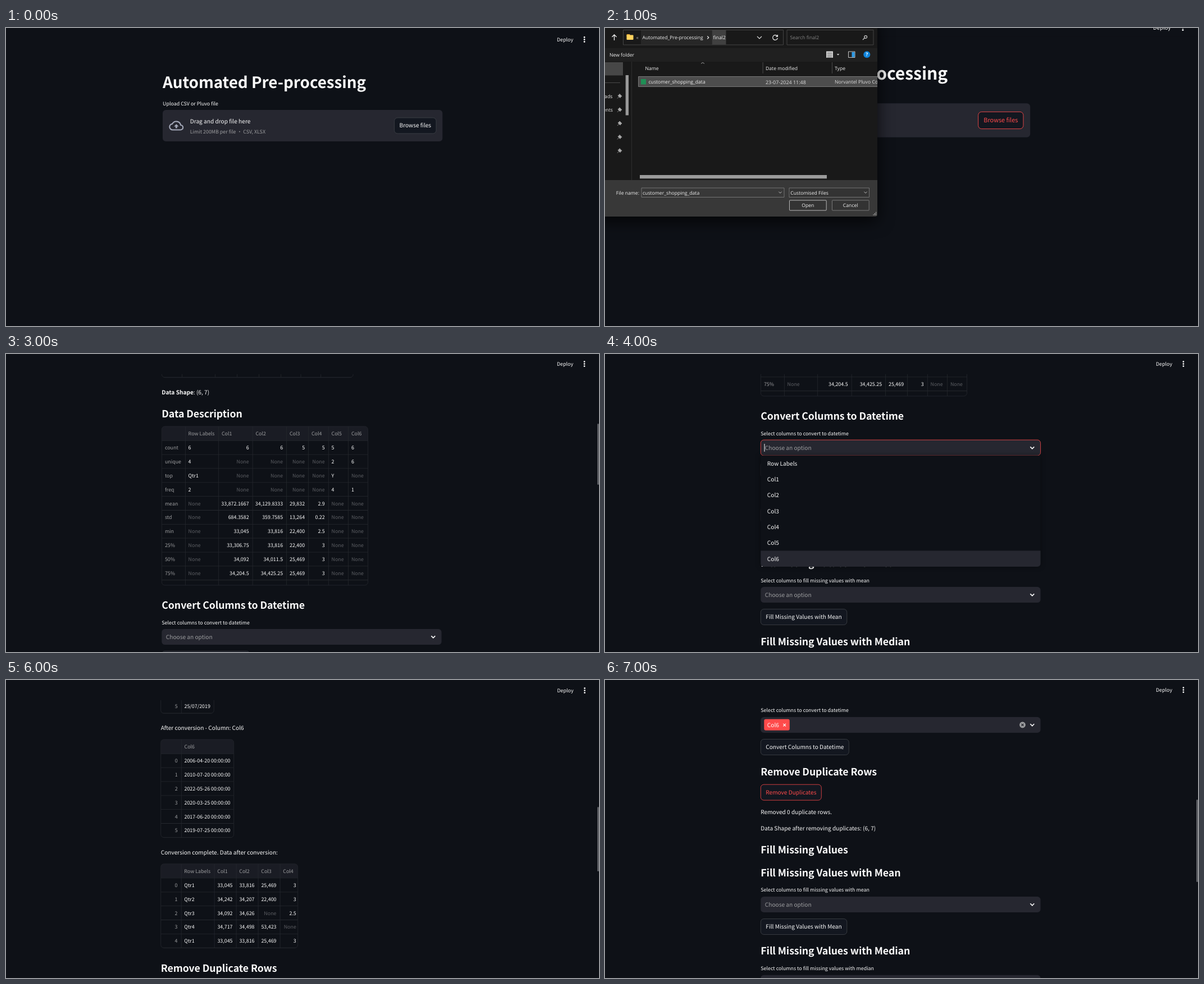
Animation of 1056x531 px, one loop 8 s. Source, as an HTML page with a canvas:

```html
<!DOCTYPE html>
<html lang="en">
<head>
<meta charset="utf-8">
<title>Automated Pre-processing</title>
<style>
html, body { margin: 0; height: 100%; overflow: hidden; background: #0e1117; }
canvas { display: block; }
</style>
</head>
<body>
<canvas id="stage" width="1056" height="531"></canvas>
<script>
const ctx = document.getElementById('stage').getContext('2d');
const SANS = '"Noto Sans CJK SC", "Noto Sans CJK JP", sans-serif';
const DIALOG_FONT = '"Open Sans", "Noto Sans", sans-serif';
const BG = '#0e1117', PANEL = '#262730', WHITE = '#fafafa', RED = '#ff4b4b';
const GREY = '#9c9d9f', DIM = '#5b5d62', LINE = '#25282e', EDGE = '#41444a';
const BODY = 10.15, SMALL = 8.88, H3 = 17.75, H1 = 27.9;
const WIDTH = 498.3, ROW = 24.85;

// y is the middle of the capital letters
function text(str, x, y, { size = BODY, color = WHITE, weight = 400, align = 'left', font = SANS, spacing = 0 } = {}) {
  ctx.font = `${weight} ${size}px ${font}`;
  ctx.letterSpacing = spacing + 'px';
  ctx.textRendering = 'geometricPrecision';
  ctx.textAlign = align;
  ctx.fillStyle = color;
  ctx.fillText(str, x, y + size * 0.367);
  return ctx.measureText(str).width;
}

function box(x, y, w, h, r, fill, stroke) {
  ctx.beginPath();
  ctx.roundRect(x, y, w, h, r);
  if (fill) { ctx.fillStyle = fill; ctx.fill(); }
  if (stroke) { ctx.strokeStyle = stroke; ctx.lineWidth = 0.8; ctx.stroke(); }
}

function disc(x, y, r, color) {
  ctx.beginPath();
  ctx.arc(x, y, r, 0, 7);
  ctx.fillStyle = color;
  ctx.fill();
}

function path(d, x, y, scale, { stroke, fill, width = 1.5 }) {
  const shape = new Path2D(d);
  ctx.save();
  ctx.translate(x, y);
  ctx.scale(scale, scale);
  if (fill) { ctx.fillStyle = fill; ctx.fill(shape); }
  if (stroke) { ctx.strokeStyle = stroke; ctx.lineWidth = width; ctx.stroke(shape); }
  ctx.restore();
}

const chevron = (x, y, s, stroke, width) => path('M-1-.5L0 .5 1-.5', x, y, s, { stroke, width: width / s });
const cross = (x, y, s, stroke, width) => path('M-1-1L1 1M1-1L-1 1', x, y, s, { stroke, width: width / s });
const heading = (str, y) => text(str, 0, y, { size: H3, weight: 600, spacing: -0.1 });
const label = (str, y) => text(str, 0, y, { size: SMALL });

function button(str, x, y, w, active) {
  box(x, y, w, 28, 5.6, '#131720', active ? RED : EDGE);
  text(str, x + w / 2, y + 13.7, { align: 'center', color: active ? RED : WHITE });
}

function select(y, { chosen, open } = {}) {
  box(0, y, WIDTH, 28, 5.6, PANEL, open && RED);
  chevron(483.5, y + 14, 3.5, WHITE, 1.7);
  if (chosen) {
    box(6, y + 3.8, 45.5, 20, 3, RED);
    text(chosen, 11.5, y + 13.8);
    cross(42.4, y + 14.2, 2.3, WHITE, 1.2);
    disc(466.2, y + 14, 5.4, GREY);
    cross(466.2, y + 14, 2, PANEL, 1.3);
  } else {
    text('Choose an option', 7.5, y + 14, { color: GREY });
  }
  if (open) box(6.2, y + 7, 1, 14, 0, WHITE);
}

function table(y, edges, align, rows, w = edges.at(-1), h = rows.length * ROW + 0.7) {
  ctx.save();
  ctx.beginPath();
  ctx.roundRect(0, y, w, h, 5.6);
  ctx.clip();
  box(0, y, w, ROW, 0, '#1a1c24');
  rows.forEach((row, r) => {
    const top = y + r * ROW;
    row.split('|').forEach((cell, c) => {
      const left = edges[c], right = edges[c + 1];
      const toRight = r > 0 && align[c] === 'r';
      const color = cell === 'None' ? DIM : r === 0 || c === 0 ? GREY : WHITE;
      ctx.save();
      ctx.beginPath();
      ctx.rect(left, top, right - left, ROW);
      ctx.clip();
      text(cell, toRight ? right - 6.2 : left + 5.6, top + 13, { size: SMALL, color, align: toRight ? 'right' : 'left' });
      ctx.restore();
    });
    box(0, top + ROW, w, 0.8, 0, LINE);
  });
  edges.slice(1, -1).forEach(x => box(x, y, 0.8, h, 0, LINE));
  ctx.restore();
  box(0, y, w, h, 5.6, null, LINE);
}

const HEAD = '|Row Labels|Col1|Col2|Col3|Col4|Col5|Col6';
const PREVIEW = [
  HEAD,
  '0|Qtr1|33,045|33,816|25,469|3|Y|20/04/2006',
  '1|Qtr2|34,242|34,207|22,400|3|N|20/07/2010',
  '2|Qtr3|34,092|34,626|None|2.5|Y|26/05/2022',
  '3|Qtr4|34,717|34,498|53,423|None|None|25/03/2020',
  '4|Qtr1|33,045|33,816|25,469|3|Y|20/06/2017'
];
const PREVIEW_EDGES = [0, 36, 95, 134, 173, 212, 247.3, 283, 341];
const SUMMARY = [
  HEAD,
  'count|6|6|6|5|5|5|6',
  'unique|4|None|None|None|None|2|6',
  'top|Qtr1|None|None|None|None|Y|None',
  'freq|2|None|None|None|None|4|1',
  'mean|None|33,872.1667|34,129.8333|29,832|2.9|None|None',
  'std|None|684.3582|359.7585|13,264|0.22|None|None',
  'min|None|33,045|33,816|22,400|2.5|None|None',
  '25%|None|33,306.75|33,816|22,400|3|None|None',
  '50%|None|34,092|34,011.5|25,469|3|None|None',
  '75%|None|34,204.5|34,425.25|25,469|3|None|None',
  'max|None|34,717|34,626|53,423|3|None|None'
];
const SUMMARY_EDGES = [0, 41.7, 101, 161.5, 222, 261, 296.6, 332, 367.2];
const DATES = PREVIEW.slice(1).map(row => row.split('|').at(-1)).concat('25/07/2019');
const iso = date => date.split('/').reverse().join('-') + ' 00:00:00';

function uploader(active) {
  text('Automated Pre-processing', 0, 95, { size: H1, weight: 700, spacing: -0.08 });
  label('Upload CSV or Pluvo file', 132.3);
  box(0, 144, WIDTH, 56, 5.6, PANEL);
  path('M6 19h13a4 4 0 0 0 .3-8 7.5 7.5 0 0 0-14-2A5 5 0 0 0 6 19z', 11.6, 159.3, 1.06, { stroke: '#a3a8b8', width: 2 });
  path('M8 13.3h2.6v3h2.8v-3H16l-4-4z', 11.6, 159.3, 1.06, { fill: '#a3a8b8' });
  text('Drag and drop file here', 48.8, 164.3);
  text('Limit 200MB per file • CSV, XLSX', 48.8, 182.5, { size: SMALL, color: GREY });
  button('Browse files', 412.6, 158, 74.4, active);
}

function loadedData() {
  path('M1 1h8l5 5v11H1zM9 1v5h5', 16.7, 213.3, 1, { stroke: '#a3a8b8', width: 1.5 });
  text('customer_shopping_data.csv', 48.8, 221.8);
  text('271.0B', 193.8, 222, { size: SMALL, color: GREY });
  cross(480.3, 223, 3.6, WHITE, 1.4);
  heading('Preview of Data', 269.5);
  table(292, PREVIEW_EDGES, 'rlrrrrll', PREVIEW);
  const bold = text('Data Shape', 0, 468.2, { weight: 700 });
  text(': (6, 7)', bold, 468.2);
  heading('Data Description', 506.7);
  table(529, SUMMARY_EDGES, 'llrrrrll', SUMMARY, SUMMARY_EDGES.at(-1), 283);
  heading('Convert Columns to Datetime', 847.3);
}

function tools(y, { chosen, open, removed } = {}) {
  label('Select columns to convert to datetime', y);
  select(y + 11.8, { chosen, open });
  button('Convert Columns to Datetime', 0, y + 51.3, 157, false);
  heading('Remove Duplicate Rows', y + 109);
  button('Remove Duplicates', 0, y + 132, 108, removed);
  if (removed) {
    text('Removed 0 duplicate rows.', 0, y + 180.7);
    text('Data Shape after removing duplicates: (6, 7)', 0, y + 210);
    y += 58;
  }
  heading('Fill Missing Values', y + 190);
  ['Mean', 'Median'].forEach((name, i) => {
    const top = y + 231 + i * 139.7;
    heading('Fill Missing Values with ' + name, top);
    label('Select columns to fill missing values with ' + name.toLowerCase(), top + 31);
    select(top + 42.8);
    button('Fill Missing Values with ' + name, 0, top + 82.3, 153.5, false);
  });
}

function options() {
  ctx.save();
  ctx.shadowColor = 'rgba(0,0,0,.4)';
  ctx.shadowBlur = 10;
  box(0, 181, WIDTH, 198, [0, 0, 5.6, 5.6], BG);
  ctx.restore();
  box(0, 350.6, WIDTH, 28.4, [0, 0, 5.6, 5.6], PANEL);
  HEAD.split('|').slice(1).forEach((name, i) => text(name, 11.5, 194.9 + i * 28.33));
}

function conversion() {
  const before = 59.5 - 7 * ROW - 0.7;
  table(before, [0, 36.2, 94.5], 'rl', ['|Col6', ...DATES.map((d, i) => `${i}|${d}`)]);
  text('After conversion - Column: Col6', 0, 85.5);
  table(106, [0, 36.2, 130], 'rl', ['|Col6', ...DATES.map((d, i) => `${i}|${iso(d)}`)]);
  text('Conversion complete. Data after conversion:', 0, 307.3);
  table(327.7, PREVIEW_EDGES, 'rlrrrrll', PREVIEW, 244);
  heading('Remove Duplicate Rows', 513);
}

function toolbar(x, y) {
  box(0, 0, 1056, 36, 0, BG);
  text('Deploy', x, y, { size: SMALL });
  for (const d of [-4, 0, 4]) disc(x + 49, y + d, 1.4, WHITE);
}

const scrollbar = (y, h) => box(1053, y, 3, h, 1.5, '#5d5f64');

function page(left, top, draw) {
  ctx.save();
  ctx.translate(left, top);
  draw();
  ctx.restore();
}

function fileDialog() {
  const say = (str, x, y, opts) => text(str, x, y, { size: 8.65, font: DIALOG_FONT, color: '#f0f0f0', ...opts });
  ctx.save();
  ctx.shadowColor = 'rgba(0,0,0,.75)';
  ctx.shadowBlur = 28;
  ctx.shadowOffsetY = 8;
  box(-20, -20, 505, 356, 4, '#383838');
  ctx.restore();
  ctx.save();
  ctx.beginPath();
  ctx.rect(0, 0, 485, 336);
  ctx.clip();
  box(0, 0, 485, 271, 0, '#191919');
  box(0, 36, 485, 24, 0, '#202020');

  // address and search
  path('M0 5V-5M-4-1L0-5 4-1', 16.5, 17, 1, { stroke: '#eee', width: 1.3 });
  box(32.5, 3.5, 285, 26.5, 0, null, '#505050');
  box(324, 3.5, 154, 26.5, 0, null, '#505050');
  box(64, 4, 126, 25.5, 0, '#272727');
  box(190.5, 4, 25, 25.5, 0, '#404040');
  box(38.5, 11, 6, 4, 1, '#e0a52e');
  box(38.5, 12.5, 12, 8.5, 1, '#ffd25e');
  say('«', 55.5, 17, { color: '#aaa' });
  say('Automated_Pre-processing', 66.5, 17);
  path('M-1.3-2.5L1.3 0-1.3 2.5', 183.5, 17, 1, { stroke: '#eee', width: 1.1 });
  say('final2', 192.5, 17);
  chevron(275, 17, 4, '#ddd', 1.2);
  path('M4-2A4.4 4.4 0 1 0 4.4 1M4.4-5v3.2H1.2', 303, 17, 1, { stroke: '#eee', width: 1.2 });
  say('Search final2', 329.5, 17, { color: '#858585' });
  path('M-4 4L-1 1M-1.2-1a2.4 2.4 0 1 0 4.8 0a2.4 2.4 0 1 0-4.8 0', 463, 17, 1, { stroke: '#ccc', width: 1.2 });

  // command row
  say('New folder', 8, 48);
  box(394, 41.5, 12, 11.5, 0, '#d5d5d5');
  for (let y = 44; y < 52; y += 2.5) box(395.5, y, 9, 0.8, 0, '#555');
  path('M-2.3-1h4.6L0 1.5z', 415, 47.3, 1, { fill: '#ddd' });
  box(433.5, 42, 11.5, 10.5, 0, '#222', '#eee');
  box(439.5, 43, 5, 8.8, 0, '#2e9be6');
  disc(466.3, 47.3, 6, '#0f84dc');
  say('?', 466.3, 47.3, { align: 'center', weight: 700, color: '#fff' });

  // navigation pane
  box(0, 61, 32, 23.5, 0, '#474747');
  box(0, 97, 27, 0.8, 0, '#555');
  box(47, 60, 0.8, 211, 0, '#333');
  box(36.7, 84, 5.3, 71.5, 0, '#999');
  say('ads', 13.3, 122, { align: 'right' });
  say('ents', 13.8, 146.3, { align: 'right' });
  for (let i = 0; i < 5; i++) {
    path('M0-4L4 0 2.5.8 1 3-3-1-.8-2.5zM-1 1L-4 4', 26, 121.5 + i * 24.3, 1, { fill: '#aaa', stroke: '#aaa', width: 0.8 });
  }

  // file list
  path('M-3 1L0-1 3 1', 174, 62.5, 1, { stroke: '#aaa', width: 0.9 });
  say('Name', 71.5, 71.5);
  say('Date modified', 286, 71.5);
  say('Type', 409, 71.5);
  box(280.7, 61, 0.8, 20, 0, '#555');
  box(404, 61, 0.8, 20, 0, '#555');
  box(59.5, 86.5, 430, 18, 0, '#4d4d4d', '#888');
  box(64, 91, 9, 9.5, 0, '#1f8f55');
  say('customer_shopping_data', 77.5, 96.3);
  say('23-07-2024 11:48', 286, 96.3, { size: 8.95, color: '#ddd' });
  say('Norvantel Pluvo Comma', 409, 96.3, { color: '#ddd' });
  box(62, 262, 333, 6.3, 0, '#9b9b9b');

  // name, filter and actions
  say('File name:', 61, 293.7, { align: 'right' });
  box(65, 285, 254, 16.5, 0, '#383838', '#858585');
  say('customer_shopping_data', 67, 293.7);
  chevron(312, 293, 2.6, '#ccc', 0.9);
  box(328, 285, 142.5, 16.5, 0, '#333', '#858585');
  say('Customised Files', 330.3, 293.7);
  chevron(464, 293, 2.6, '#ccc', 0.9);
  box(328.5, 307, 65.7, 18, 1, '#333', '#d8d8d8');
  say('Open', 361.3, 316.2, { align: 'center' });
  box(404.5, 307, 65.7, 18, 1, '#333', '#8a8a8a');
  say('Cancel', 437.2, 316.2, { align: 'center' });
  for (let i = 0; i < 3; i++) {
    for (let j = 0; j <= i; j++) box(477.5 + i * 2.2, 332.3 - j * 2.2, 1.3, 1.3, 0, '#bbb');
  }
  ctx.restore();
}

const scenes = [
  () => {
    page(279, 2, () => uploader(false));
    toolbar(981, 20.5);
  },
  () => {
    ctx.save();
    ctx.transform(1.08, 0, 0, 1.08, -82.3, -23.4);
    page(279, 2, () => uploader(true));
    toolbar(980, 21);
    ctx.restore();
    fileDialog();
  },
  () => {
    page(277.7, 0, () => { uploader(true); loadedData(); });
    toolbar(982.5, 18.7);
    scrollbar(36, 109);
  },
  () => {
    page(277.3, -400, () => { loadedData(); tools(878.3); });
    toolbar(981, 17.7);
    scrollbar(124, 109);
  },
  () => {
    page(277.3, -737, () => { loadedData(); tools(878.3, { open: true }); });
    page(277.3, 0, options);
    toolbar(981, 17.7);
  },
  () => {
    page(277.3, -737, () => { loadedData(); tools(878.3, { chosen: 'Col6' }); });
    toolbar(981, 17.7);
    scrollbar(198, 109);
  },
  () => {
    page(275.7, 0, conversion);
    toolbar(981.5, 18.7);
    scrollbar(226, 115);
  },
  () => {
    page(277.3, 0, () => tools(54.2, { chosen: 'Col6', removed: true }));
    toolbar(981, 17.7);
    scrollbar(213, 147);
  }
];

function frame() {
  ctx.fillStyle = BG;
  ctx.fillRect(0, 0, 1056, 531);
  scenes[Math.floor(performance.now() / 1000) % scenes.length]();
  requestAnimationFrame(frame);
}
frame();
</script>
</body>
</html>
```
